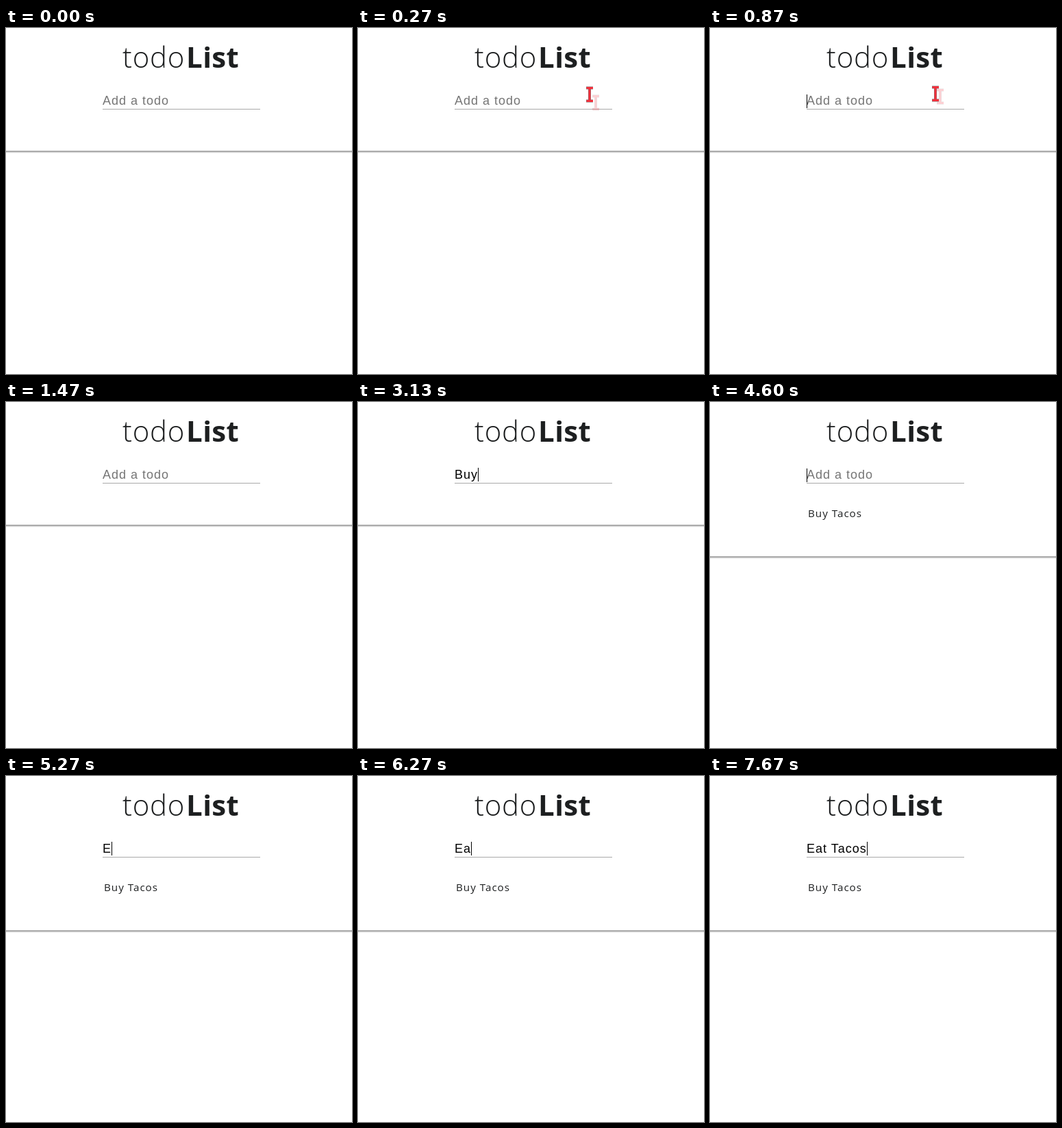
These frames come from a looping animation (505 by 505 pixels, 8000 ms). An HTML page:

```html
<!DOCTYPE html>
<html lang="en">
<head>
<meta charset="utf-8">
<title>todoList</title>
<style>
  html, body { margin: 0; width: 100%; height: 100%; overflow: hidden; background: #fff; }
  #card { position: absolute; left: 0; top: 0; width: 505px; background: #fff; }
  #card::after {
    content: ""; position: absolute; left: 0; top: 100%; width: 100%; height: 4px;
    background: linear-gradient(#b0b0b0 1px, #a8a8a8 1px 2px, #dadada 2px 3px, #f4f4f4 3px);
  }
  h1, p { position: absolute; margin: 0; white-space: pre; color: #1d1f20; }
  h1 { top: 17px; font: 340 42px/50px "Open Sans", sans-serif; }
  #thin { left: 170px; letter-spacing: .7px; }
  #bold { left: 263px; font-weight: 700; letter-spacing: .4px; }
  #field {
    left: 141px; top: 96px; width: 230px; height: 22px; border-bottom: 1px solid #a9a9a9;
    font: 18px/20px "Liberation Sans", Arial, sans-serif; letter-spacing: 1px;
  }
  #caret { position: absolute; width: 1px; height: 20px; background: #000; }
  #item { left: 143px; top: 152px; font: 500 15.2px/20px "Open Sans", sans-serif; letter-spacing: 1px; }
  svg { position: absolute; left: 0; top: 0; }
</style>
</head>
<body>
<div id="card">
  <h1 id="thin">todo</h1><h1 id="bold">List</h1>
  <p id="field"><span id="text"></span><span id="caret"></span></p>
  <p id="item">Buy Tacos</p>
</div>
<svg width="505" height="505" fill="none">
  <defs>
    <g id="beam">
      <path d="M1 2.5H11M6 2.5V21.5M1 21.5H11" stroke="#777" stroke-width="4"/>
      <path d="M1.5 2.5H11M6 2.5V21.5M1.5 21.5H11" stroke="#f2303c" stroke-width="3"/>
    </g>
  </defs>
  <use id="ghost" href="#beam" opacity=".22"/>
  <use id="pointer" href="#beam"/>
</svg>
<script>
const LOOP = 8000;
const $ = id => document.getElementById(id);

// [start ms, typed text]
const typing = [
  [0, ""], [2870, "B"], [3000, "Bu"], [3130, "Buy"], [3270, "Buy "], [3330, "Buy T"],
  [3600, "Buy Ta"], [3730, "Buy Tac"], [3930, "Buy Taco"], [4070, "Buy Tacos"], [4270, ""],
  [5270, "E"], [5670, "Eas"], [6000, "East"], [6130, "Eas"], [6270, "Ea"], [6400, "Eat"],
  [6730, "Eat "], [6870, "Eat T"], [7130, "Eat Ta"], [7530, "Eat Taco"], [7670, "Eat Tacos"]
];
// [start ms, caret visible]
const blink = [[0, 0], [870, 1], [1470, 0], [2070, 1], [2600, 0], [2870, 1], [4930, 0], [5270, 1]];
// [start ms, x, y]; no position means hidden
const path = [
  [0], [70, 486, 113], [130, 410, 106], [200, 341, 97], [270, 332, 85],
  [530, 334, 91], [600, 330, 88], [670, 323, 84], [1070, 340, 87], [1130, 386, 93], [1200]
];

const indexAt = (steps, t) => steps.findLastIndex(s => s[0] <= t);

function place(el, step) {
  const shown = step && step.length > 1;
  el.style.display = shown ? "" : "none";
  if (shown) el.setAttribute("transform", `translate(${step[1]} ${step[2]})`);
}

function draw(t) {
  const typed = typing[indexAt(typing, t)][1];
  $("text").textContent = typed || "Add a todo";
  $("text").style.color = typed ? "#000" : "#757575";

  const caret = $("caret").style;
  caret.visibility = blink[indexAt(blink, t)][1] ? "visible" : "hidden";
  caret.left = typed ? "auto" : "0";
  caret.top = typed ? "0" : "1px";

  const listed = t >= 4600;
  $("item").style.display = listed ? "" : "none";
  $("card").style.height = (listed ? 225 : 179) + "px";

  const i = indexAt(path, t);
  place($("pointer"), path[i]);
  place($("ghost"), path[i].length > 1 ? path[i - 1] : null);
}

const start = performance.now();
function frame() {
  draw((performance.now() - start) % LOOP);
  requestAnimationFrame(frame);
}
frame();
</script>
</body>
</html>
```
